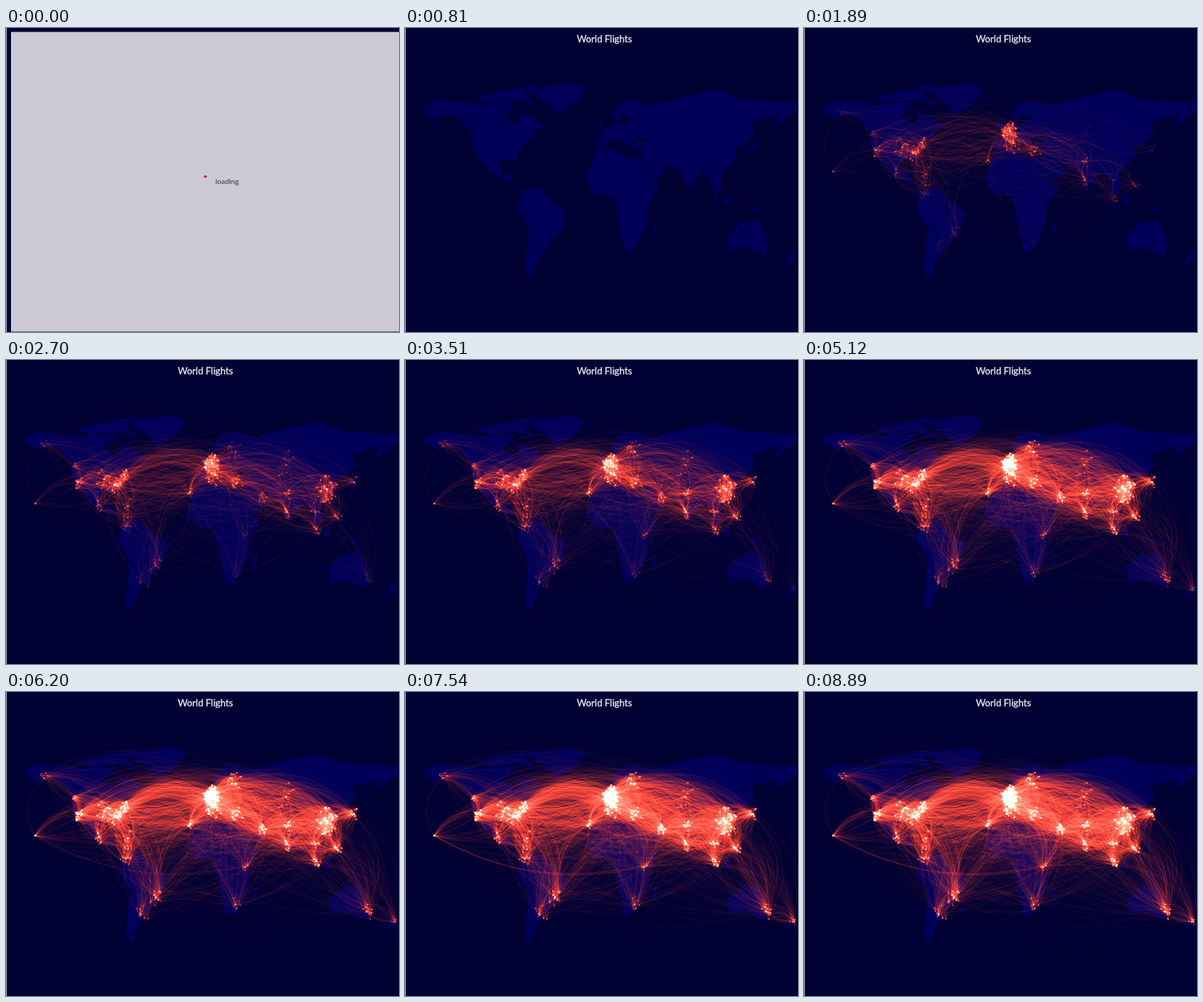
Write an HTML page with a canvas that moves like this. It is 550 px wide and 425 px high and loops after 9.03 s.

```html
<!DOCTYPE html>
<html lang="en">
<head>
<meta charset="utf-8">
<title>World Flights</title>
<style>
  html, body { margin: 0; width: 100%; height: 100%; overflow: hidden; background: #000033; }
  canvas { display: block; }
</style>
</head>
<body>
<canvas id="stage" width="550" height="425"></canvas>
<script>
const W = 550, H = 425;
const LOOP = 9030, MAP_START = 810, STEPS = 30, STEP = 8080 / STEPS;
const NAVY = "#000033", LAND = "#000058", EDGE = "#b9b9cb";
const stage = document.getElementById("stage").getContext("2d");
const layer = document.createElement("canvas");
layer.width = W;
layer.height = H;
const sky = layer.getContext("2d");

let seed = 20117;
function random() {
  seed = (seed + 0x6D2B79F5) | 0;
  let n = Math.imul(seed ^ (seed >>> 15), 1 | seed);
  n = (n + Math.imul(n ^ (n >>> 7), 61 | n)) ^ n;
  return ((n ^ (n >>> 14)) >>> 0) / 4294967296;
}
const between = (low, high) => low + (high - low) * random();

// Longitude and latitude to stage pixels.
const project = (lon, lat) => ({ x: 279 + 1.508 * lon, y: 243 - 2.01 * lat });

// ---- Land: key points of each coast ----
const coast = new Path2D();
function land(corners) {
  corners.split(" ").forEach((corner, i) => {
    const p = project(...corner.split(",").map(Number));
    i ? coast.lineTo(p.x, p.y) : coast.moveTo(p.x, p.y);
  });
  coast.closePath();
}
// The Americas
land("-168,66 -156,71 -115,68 -95,69 -82,69 -94,59 -82,54 -78,62 -65,59 -56,52 -66,49 -64,45 -74,41 -81,31 -81,25 -84,30 -97,28 -95,18 -88,21 -84,10 -78,8 -95,16 -106,21 -114,31 -110,23 -123,38 -124,48 -135,59 -149,61 -162,55 -157,59 -166,62");
land("-122,73 -95,77 -62,82 -75,76 -62,66 -80,71 -105,69");
land("-73,78 -32,83 -18,79 -25,70 -44,60 -53,68");
land("-77,8 -62,10 -50,1 -35,-7 -40,-21 -48,-27 -62,-40 -68,-54 -74,-50 -70,-18 -81,-5");
// Africa
land("-6,36 10,37 20,31 33,31 43,12 51,11 40,-4 40,-15 27,-34 19,-35 9,0 8,4 -8,5 -17,14 -10,30");
land("49,-12 47,-25 44,-20");
// Eurasia
land("-9,43 -1,44 -4,48 9,54 20,54 24,59 17,61 13,56 6,59 14,69 27,71 44,67 75,73 104,78 130,71 180,69 178,63 157,52 162,61 136,55 140,48 128,38 122,39 122,30 108,20 109,12 103,2 98,16 91,22 80,11 77,8 72,21 57,26 48,30 58,21 44,13 35,28 36,36 27,37 29,41 41,42 31,46 23,38 13,45 17,39 9,44 -1,37 -9,37");
land("-5,50 1,52 -4,58");
land("130,32 140,36 143,43");
// Islands and Australia
land("95,5 106,-5 103,-4");
land("109,1 117,6 115,-4");
land("131,-1 150,-9 138,-7");
land("114,-23 130,-13 136,-15 142,-11 153,-27 149,-38 137,-34 130,-32 116,-34");
land("173,-34 178,-38 167,-46");

// ---- Regions: a hub with smaller airports around it ----
const regions = [];
function region(lon, lat, radius, traffic, start = 0, end = 21) {
  const airports = [project(lon, lat)];
  while (airports.length < 2 + traffic * 1.3) {
    const angle = between(0, Math.PI * 2), r = radius * Math.sqrt(random());
    airports.push(project(lon + r * Math.cos(angle), lat + r * Math.sin(angle)));
  }
  const made = { hub: airports[0], airports, traffic, start, end };
  regions.push(made);
  return made;
}
// North America
region(-75, 41, 4, 12);
region(-84, 34, 6, 13);
region(-94, 38, 8, 11);
region(-118, 36, 5, 12);
region(-122, 47, 2, 4);
region(-150, 61, 5, 3);
const hawaii = region(-158, 21, 0.3, 3);
region(-99, 20, 5, 5);
region(-72, 19, 8, 5);
// South America
region(-74, 5, 5, 5);
region(-46, -22, 6, 8, 2, 30);
region(-60, -34, 8, 5, 2, 30);
// Europe and Africa
region(6, 49, 8, 31);
region(9, 41, 9, 12);
region(-14, 29, 3, 6);
region(29, 35, 6, 9);
region(28, 57, 8, 8, 5);
const eastAfrica = region(37, -1, 4, 3, 5, 30);
region(28, -27, 5, 4, 2, 30);
// Asia
region(53, 25, 4, 10, 4, 24);
region(75, 48, 12, 4, 2);
region(77, 28, 4, 7);
region(76, 15, 5, 7);
region(113, 31, 10, 25, 4, 14);
region(138, 36, 5, 8, 3);
region(103, 3, 4, 8, 2, 26);
region(102, 15, 4, 6, 2, 26);
region(123, 11, 4, 7);
// Oceania
region(150, -32, 6, 9, 5, 30);
region(175, -39, 3, 5, 8, 30);

// ---- Routes ----
const routes = [];
const pick = list => list[Math.floor(list.length * Math.pow(random(), 1.7))];
const freeBend = () => random() < 0.6 ? between(0.12, 0.22) : between(-0.14, -0.03);

// bend is the height of the arc as a share of its length.
function connect(from, to, count, alpha, bend = freeBend) {
  const start = Math.max(from.start, to.start), end = Math.max(from.end, to.end);
  for (let i = 0; i < count; i++) {
    const [a, b] = [pick(from.airports), pick(to.airports)].sort((p, q) => p.x - q.x);
    routes.push({ a, b, bend: bend(), alpha: alpha * between(0.6, 1.4), birth: between(start, end) });
  }
}

// Busy and close regions share the most routes; long routes are fainter.
regions.forEach((from, i) => regions.slice(i).forEach(to => {
  const distance = Math.hypot(from.hub.x - to.hub.x, from.hub.y - to.hub.y);
  const count = Math.round(from.traffic * to.traffic / (1 + distance / 30));
  connect(from, to, count, 0.14 / (1 + (distance / 190) ** 2));
}));
connect(hawaii, eastAfrica, 4, 0.2, () => -0.1);
routes.sort((a, b) => a.birth - b.birth);

// ---- Drawing ----
function drawRoute({ a, b, alpha, bend }) {
  const dx = b.x - a.x, dy = b.y - a.y;
  sky.globalAlpha = alpha;
  sky.beginPath();
  sky.moveTo(a.x, a.y);
  sky.quadraticCurveTo((a.x + b.x) / 2 + dy * 2 * bend, (a.y + b.y) / 2 - dx * 2 * bend, b.x, b.y);
  sky.stroke();
  sky.globalAlpha = alpha * 0.4;
  for (const end of [a, b]) {
    sky.beginPath();
    sky.arc(end.x, end.y, 1, 0, Math.PI * 2);
    sky.fill();
  }
}

// Overlapping routes add up from clear through red to white.
sky.globalCompositeOperation = "lighter";
sky.fillStyle = sky.strokeStyle = "rgb(255, 54, 42)";
sky.lineWidth = 0.7;

let drawn = 0;
function growRoutes(step) {
  let goal = routes.findIndex(route => route.birth > step);
  if (goal < 0) goal = routes.length;
  if (goal < drawn) {
    sky.clearRect(0, 0, W, H);
    drawn = 0;
  }
  while (drawn < goal) drawRoute(routes[drawn++]);
}

function label(text, x, y, font, color) {
  stage.font = font;
  stage.fillStyle = color;
  stage.fillText(text, x, y);
}

function drawLoading() {
  stage.fillStyle = "#cccbd5";
  stage.fillRect(7, 5.5, W, 418.5);
  stage.fillStyle = "#65656d";
  stage.fillRect(7, 424, W, 1);
  stage.fillStyle = "#cc2a33";
  stage.beginPath();
  stage.ellipse(279, 207.8, 2.3, 1.7, 0, 0, Math.PI * 2);
  stage.fill();
  stage.textAlign = "left";
  label("loading", 293, 217.5, "10.4px Lato, sans-serif", "#33333b");
}

function drawTooltip() {
  stage.fillStyle = "#b6b6c6";
  stage.beginPath();
  stage.roundRect(13, 414, 60, 20, 3);
  stage.fill();
  label("苔鹿听歌", 43, 427, "10px 'Noto Sans CJK SC', 'Noto Sans CJK', sans-serif", "#33334a");
}

function drawFlights(time) {
  growRoutes(Math.floor((time - MAP_START + 5) / STEP));
  stage.fillStyle = LAND;
  stage.fill(coast);
  stage.drawImage(layer, 0, 0);
  stage.textAlign = "center";
  label("World Flights", 279, 20, "13.2px Lato, sans-serif", "#e6e6ee");
  stage.strokeStyle = "#e6e6ee";
  stage.lineWidth = 0.35;
  stage.strokeText("World Flights", 279, 20);
  if (time >= 3775 && time < 4580) drawTooltip();
}

function frame() {
  const time = performance.now() % LOOP;
  stage.fillStyle = NAVY;
  stage.fillRect(0, 0, W, H);
  if (time < MAP_START) drawLoading();
  else drawFlights(time);
  stage.fillStyle = EDGE;
  stage.fillRect(0, 0, 1, H);
  requestAnimationFrame(frame);
}
frame();
</script>
</body>
</html>
```
